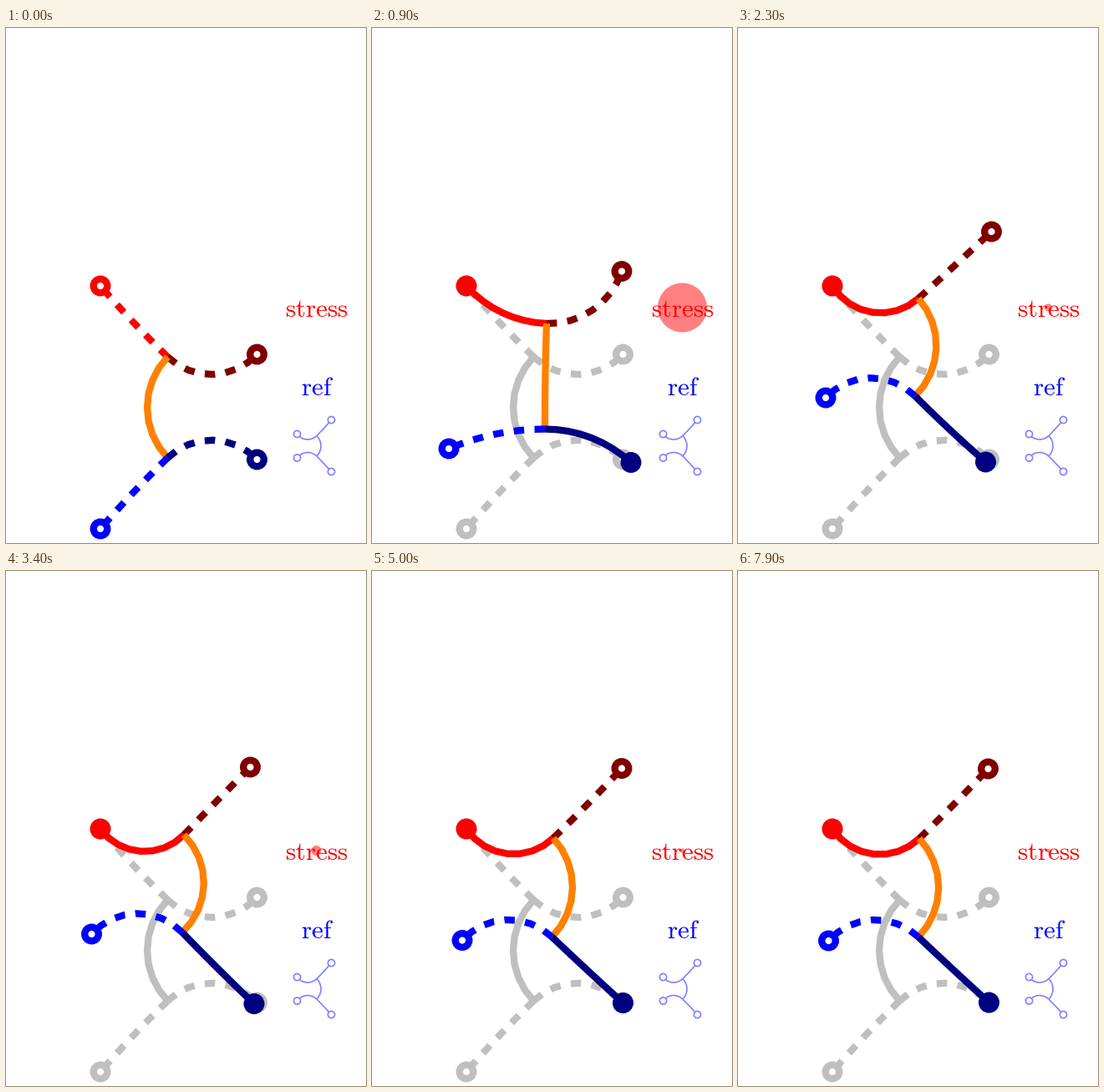
A matplotlib script for the animation above (8000 ms loop, 431 by 617 pixels).

```python
import numpy as np
import matplotlib.pyplot as plt
from matplotlib.animation import FuncAnimation
from matplotlib.patches import Circle

W, H, DPI = 431, 617, 64
PT = 72 / DPI
FRAMES, STEP = 80, 100
plt.rcParams["mathtext.fontset"] = "cm"

RED, DARK_RED, ORANGE = "#ff0000", "#800000", "#ff8000"
BLUE, NAVY, GRAY, PALE_BLUE = "#0000ff", "#000080", "#bfbfbf", "#8080ff"
DASH = (0, (1.5, 1.5))
ANCHOR = (113, 309)

# time, upper joint x, y, heading, lower joint x, y, heading
JOINTS = np.array([
    [0.0, 193.5, 394, 44, 193.5, 515, -44],
    [0.4, 180, 397, 22, 160, 517, -24],
    [0.9, 209, 354, 2, 207, 480.5, 0],
    [1.2, 213, 338, -22, 203, 463, 22],
    [1.8, 216, 324, -40, 211, 445, 42],
    [2.3, 216, 324, -42, 212, 441, 45],
    [3.4, 213, 316, -46, 211, 433, 46],
    [5.0, 217, 320, -44, 215.5, 438.5, 43.5],
    [6.4, 217, 320.5, -44, 216, 438.5, 43.5],
])

# time, then the three moving tips: upper right, lower left, lower right
TIPS = np.array([
    [0.0, 300.5, 391, 113, 600, 300.5, 517],
    [0.4, 292, 340, 20, 550, 285, 517],
    [0.9, 299, 291.5, 92, 504, 310, 520.5],
    [1.2, 303, 225, 60, 478, 307, 550],
    [1.8, 304, 233, 95, 449, 303, 525],
    [2.3, 303.5, 244, 105, 443, 296.5, 520],
    [2.75, 298, 239, 97, 438, 300, 524],
    [3.4, 292.5, 235, 102.5, 435, 297, 518.5],
    [3.7, 296, 229, 108, 437, 300, 520],
    [5.0, 299, 236.5, 108, 442.5, 300.5, 517.5],
    [6.4, 299.5, 237, 108.5, 443, 300.5, 517],
])

# time, disc radius
STRESS = np.array([
    [0, 66], [0.4, 58], [0.9, 29.5], [1.2, 55], [1.8, 23], [2.3, 4.5],
    [2.8, 9.5], [3.4, 6], [3.7, 8], [4.5, 4], [5, 2.7], [6.4, 2.2],
])


def track(keys, t):
    """Smooth curve through the keys, held after the last one."""
    ts, vals = keys[:, 0], keys[:, 1:]
    if t >= ts[-1]:
        return vals[-1]
    slopes = np.gradient(vals, ts, axis=0)
    slopes[-1] = 0
    i = np.searchsorted(ts, t, side="right") - 1
    h = ts[i + 1] - ts[i]
    u = (t - ts[i]) / h
    return ((1 + 2 * u) * (1 - u) ** 2 * vals[i]
            + u * (1 - u) ** 2 * h * slopes[i]
            + u * u * (3 - 2 * u) * vals[i + 1]
            - u * u * (1 - u) * h * slopes[i + 1])


def arc(p, q, heading, n=8):
    """Circular arc from p to q that leaves p at the given heading."""
    dx, dy = q[0] - p[0], q[1] - p[1]
    turn = np.arctan2(dy, dx) - np.radians(heading)
    turn = (turn + np.pi) % (2 * np.pi) - np.pi
    u = np.linspace(0, 1, n + 1)
    reach = u if abs(turn) < 1e-4 else np.sin(turn * u) / np.sin(turn)
    reach = reach * np.hypot(dx, dy)
    angle = np.radians(heading) + turn * u
    return p[0] + reach * np.cos(angle), p[1] + reach * np.sin(angle)


def limbs(joints, tips, anchor=ANCHOR):
    """Curves in drawing order: two upper arms, link, two lower arms."""
    j1, a1, j2, a2 = joints[:2], joints[2], joints[3:5], joints[5]
    chord = np.degrees(np.arctan2(j2[1] - j1[1], j2[0] - j1[0]))
    return [
        arc(j1, anchor, a1 + 180),
        arc(j1, tips[:2], a1),
        arc(j1, j2, chord - (a2 - a1) / 2),
        arc(j2, tips[2:4], a2 + 180),
        arc(j2, tips[4:6], a2),
    ]


class Frame:
    """Five rods with a ring at each of the four ends."""

    def __init__(self, colors, z, width=8.3, radius=8.3, dashed=True):
        self.lines, self.rings = [], []
        for k, color in enumerate(colors):
            line, = ax.plot([], [], color=color, lw=width * PT, zorder=z,
                            solid_capstyle="butt", dash_capstyle="butt",
                            solid_joinstyle="miter", dash_joinstyle="miter")
            if dashed and k != 2:
                line.set_linestyle(DASH)
            self.lines.append(line)
            if k != 2:
                ring = Circle((0, 0), radius, fc="white", ec=color,
                              lw=width * PT, zorder=z + 0.5)
                self.rings.append(ax.add_patch(ring))

    def pose(self, curves):
        for line, (x, y) in zip(self.lines, curves):
            line.set_data(x, y)
        ends = [c for k, c in enumerate(curves) if k != 2]
        for ring, (x, y) in zip(self.rings, ends):
            ring.center = x[-1], y[-1]

    def hold(self, on):
        """Solid rod and filled end for the two gripping arms."""
        for k, r in ((0, 0), (4, 3)):
            color = self.lines[k].get_color()
            self.lines[k].set_linestyle("-" if on else DASH)
            self.rings[r].set_facecolor(color if on else "white")

    def show(self, on):
        for part in self.lines + self.rings:
            part.set_visible(on)


fig = plt.figure(figsize=(W / DPI, H / DPI), dpi=DPI, facecolor="white")
ax = fig.add_axes([0, 0, 1, 1])
ax.axis("off")

disc = ax.add_patch(Circle((371.5, 335), 1, fc="#ff8080", ec="none", zorder=1))
ghost = Frame([GRAY] * 5, z=2)
ghost.pose(limbs(JOINTS[0, 1:], TIPS[0, 1:]))
body = Frame([RED, DARK_RED, ORANGE, BLUE, NAVY], z=4)

icon = Frame([PALE_BLUE] * 5, z=2, width=1.66, radius=4.1, dashed=False)
icon.pose(limbs(np.array([372, 488.5, -45, 372, 513, 45]),
                np.array([389.5, 469.5, 348.5, 515, 389.5, 531.5]),
                (348.5, 486.5)))

for word, x, y, color in (("stress", 371.8, 345.5, RED), ("ref", 372.4, 440.5, BLUE)):
    ax.text(x, y, rf"$\mathrm{{{word}}}$", color=color, fontsize=31.2 * PT,
            ha="center", va="baseline", zorder=6)

ax.set_xlim(0, W)
ax.set_ylim(H, 0)


def draw(i):
    t = i * STEP / 1000
    moving = i > 0
    body.pose(limbs(track(JOINTS, t), track(TIPS, t)))
    body.hold(moving)
    ghost.show(moving)
    disc.set_visible(moving)
    disc.set_radius(max(track(STRESS, t)[0], 2))
    return []


anim = FuncAnimation(fig, draw, frames=FRAMES, interval=STEP,
                     init_func=lambda: draw(0), repeat=True,
                     repeat_delay=0, blit=False)
plt.show()
```
